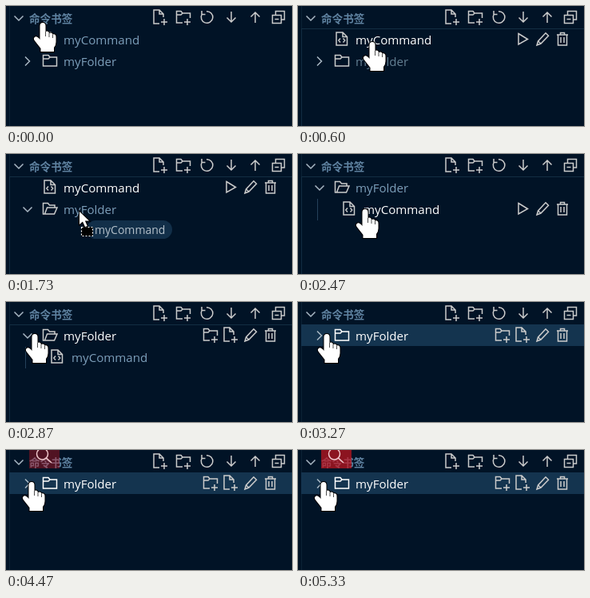
Animation, 358 px wide and 150 px high, one loop 5540 ms. Source, as an HTML page with a canvas:

```html
<!DOCTYPE html>
<html lang="zh">
<head>
<meta charset="utf-8">
<title>Tree drag and drop</title>
<style>
  html, body { margin: 0; width: 100%; height: 100%; overflow: hidden; background: #011326; }
  canvas { display: block; }
</style>
</head>
<body>
<canvas id="stage" width="358" height="150"></canvas>
<script>
const ctx = document.getElementById('stage').getContext('2d');
const LOOP = 5540, TICK = 200 / 3, ROW = 27;
const FONT = '"Open Sans", "Noto Sans", sans-serif';
const COLOR = {
  back: '#011326', line: '#122d42', edge: '#0b2235', selected: '#14344f', icon: '#cbcbcb',
  text: '#7d9fba', dim: '#648093', header: '#5f82a0', white: '#ffffff'
};

// Icons live in 20 x 20 boxes.
const ICON = {
  newFile: 'M9 18H2V1H9L14 6V10M9 1V6H14M15 12V20M11 16H19',
  newFolder: 'M9 17H1.5V2.5H7L9 5H18.5V11M1.5 7H7L9 5M15 12V20M11 16H19',
  refresh: 'M4 2V6.5H8.5M4.3 6.2A7.3 7.3 0 1 0 10 2.7',
  down: 'M10 3V16M4.5 10.5L10 16L15.5 10.5',
  up: 'M10 17V4M4.5 9.5L10 4L15.5 9.5',
  collapse: 'M1.5 7.5H12.5V17.5H1.5ZM4.5 12.5H9.5M5.5 7.5V2.5H16.5V13H12.5',
  file: 'M3 2H11L16.5 7.5V18H3ZM11 2V7.5H16.5M8 9.5L5.8 12L8 14.5M11.5 9.5L13.7 12L11.5 14.5',
  folder: 'M1.5 3.5H8L10 6H18.5V17H1.5ZM1.5 8H8L10 6',
  folderOpen: 'M3.5 17L6.5 9H19L15.5 17H1.5V3.5H7.5L9.5 6H16V9',
  play: 'M5 3.5L16.5 10.5L5 17Z',
  edit: 'M3 18L4.5 13L14 2.8L17.5 6.3L8 16ZM4.5 13L8 16',
  trash: 'M3 5H17M7.5 5V2.5H12.5V5M4.5 5V18H15.5V5M8 8V15M12 8V15',
  chevronDown: 'M4.5 7.5L10 13L15.5 7.5',
  chevronRight: 'M7 4.5L12.5 10L7 15.5'
};
for (const name in ICON) ICON[name] = new Path2D(ICON[name]);

// Pointers are drawn from their hot spot.
const HAND = new Path2D('M-3.5 4Q-3.5 0 0 0Q3.5 0 3.5 4V11Q7 9.5 8 13Q11.5 11.5 12.5 14.5Q16.5 13.5 16.5 18V24Q16.5 28 14 31V36H-2.5V32L-10 22.5Q-12.5 19 -9.5 17.5Q-7 16.5 -3.5 21Z');
const KNUCKLES = new Path2D('M3.5 11V17M8 13V18M12.5 14.5V19');
const ARROW = new Path2D('M0 0V16L4 12.5L7 19L9.8 18L6.9 11.5H12Z');

// Pointer path: [tick, x, y]
const PATH = [
  [0, 46, 21], [6, 93, 45], [10, 93, 45], [14, 93, 60], [16, 93, 60],
  [17, 94, 64], [24, 92, 71], [25, 92, 71], [26, 92, 72], [28, 92, 72],
  [29, 92, 74], [36, 92, 74], [43, 36, 40], [51, 36, 40], [54, 32, 40], [90, 32, 40]
];

function pointerAt(tick) {
  const i = PATH.findIndex(p => p[0] > tick);
  const [t0, x0, y0] = PATH[i - 1], [t1, x1, y1] = PATH[i];
  const u = (tick - t0) / (t1 - t0);
  return { x: x0 + (x1 - x0) * u, y: y0 + (y1 - y0) * u };
}

function at(x, y, draw) {
  ctx.save();
  ctx.translate(x, y);
  draw();
  ctx.restore();
}

function icon(name, x, y, color = COLOR.icon) {
  at(x, y, () => {
    ctx.strokeStyle = color;
    ctx.lineWidth = 1.5;
    ctx.stroke(ICON[name]);
  });
}

function label(text, x, y, color, font) {
  ctx.font = font || `15.1px ${FONT}`;
  ctx.fillStyle = color;
  ctx.fillText(text, x, y);
}

function box(x, y, w, h, color) {
  ctx.fillStyle = color;
  ctx.fillRect(x, y, w, h);
}

function header() {
  icon('chevronDown', 6, 5, '#a9b8c4');
  label('命令书签', 29, 21, COLOR.header, 'bold 13.6px "Noto Sans CJK SC", "Noto Sans CJK", sans-serif');
  const tools = { newFile: 183, newFolder: 212, refresh: 241, down: 272, up: 302, collapse: 332 };
  for (const name in tools) icon(name, tools[name], 4);
}

function actions(names, y) {
  names.forEach((name, i) => icon(name, 321 - 25 * (names.length - 1 - i), y));
}

function commandRow(row, nested, hover) {
  const y = 31 + row * ROW;
  if (nested) box(24, 56, 1, ROW, '#24415a');
  icon('file', nested ? 54 : 45, y);
  label('myCommand', nested ? 82 : 72, y + 17, hover ? COLOR.white : COLOR.text);
  if (hover) actions(['play', 'edit', 'trash'], y);
}

function folderRow(row, open, iconOpen, color, hover, selected) {
  const y = 31 + row * ROW;
  icon(open ? 'chevronDown' : 'chevronRight', 17, y + 1, '#a9b8c4');
  icon(iconOpen ? 'folderOpen' : 'folder', 45, y, selected ? COLOR.white : COLOR.icon);
  label('myFolder', 72, y + 17, color);
  if (hover) actions(['newFolder', 'newFile', 'edit', 'trash'], y);
}

function hand() {
  ctx.strokeStyle = '#000';
  ctx.lineWidth = 2;
  ctx.stroke(HAND);
  ctx.fillStyle = COLOR.white;
  ctx.fill(HAND);
  ctx.lineWidth = 0.7;
  ctx.stroke(KNUCKLES);
}

function dragged() {
  ctx.fillStyle = '#122f49';
  ctx.beginPath();
  ctx.roundRect(9, 11, 107, 23, 11.5);
  ctx.fill();
  label('myCommand', 19, 28, '#b4c0ca', `14px ${FONT}`);
  box(2, 19, 15, 12, '#000');
  ctx.strokeStyle = COLOR.white;
  ctx.lineWidth = 1.2;
  ctx.setLineDash([2, 2]);
  ctx.strokeRect(2.5, 19.5, 14, 11);
  ctx.setLineDash([]);
  ctx.strokeStyle = '#000';
  ctx.lineWidth = 2;
  ctx.stroke(ARROW);
  ctx.fillStyle = COLOR.white;
  ctx.fill(ARROW);
}

function searchBadge(tick) {
  ctx.globalAlpha = 0.4 + 0.1 * Math.floor((tick - 65) / 5);
  box(29, 0, 38, 23, '#c8141e');
  ctx.globalAlpha = 1;
  ctx.strokeStyle = '#f0c8cc';
  ctx.lineWidth = 1.5;
  ctx.beginPath();
  ctx.arc(45.5, 5, 7, 0, 2 * Math.PI);
  ctx.moveTo(50.5, 10);
  ctx.lineTo(57, 16);
  ctx.stroke();
}

function draw(time) {
  const tick = Math.floor((time + 4) / TICK);
  const pointer = pointerAt(tick);
  const dragging = tick >= 11 && tick < 29;
  const moved = tick >= 31, selected = tick >= 48;
  const hover = dragging ? 0 : Math.floor((pointer.y - 28) / ROW);

  box(0, 0, 358, 150, COLOR.back);
  box(4, 0, 1, 150, COLOR.edge);
  if (tick >= 9 && !selected) {
    box(4, 28, 354, 1, COLOR.line);
    box(4, 28, 1, 122, COLOR.line);
  }
  if (selected) box(4, 28, 354, ROW, COLOR.selected);
  header();

  if (moved) {
    const open = !selected || (tick >= 58 && tick < 65);
    const active = hover === 0 || selected;
    folderRow(0, open, open && tick !== 58, active ? COLOR.white : COLOR.text, active, selected);
    if (open) commandRow(1, true, hover === 1);
  } else {
    const open = tick >= 23;
    const rest = tick >= 2 && !open ? COLOR.dim : COLOR.text;
    commandRow(0, false, hover === 0);
    folderRow(1, open, open, hover === 1 ? COLOR.white : rest, hover === 1);
  }

  if (tick >= 66) searchBadge(tick);
  at(Math.round(pointer.x), Math.round(pointer.y), dragging ? dragged : hand);
}

function frame() {
  draw(performance.now() % LOOP);
  requestAnimationFrame(frame);
}
frame();
</script>
</body>
</html>
```
